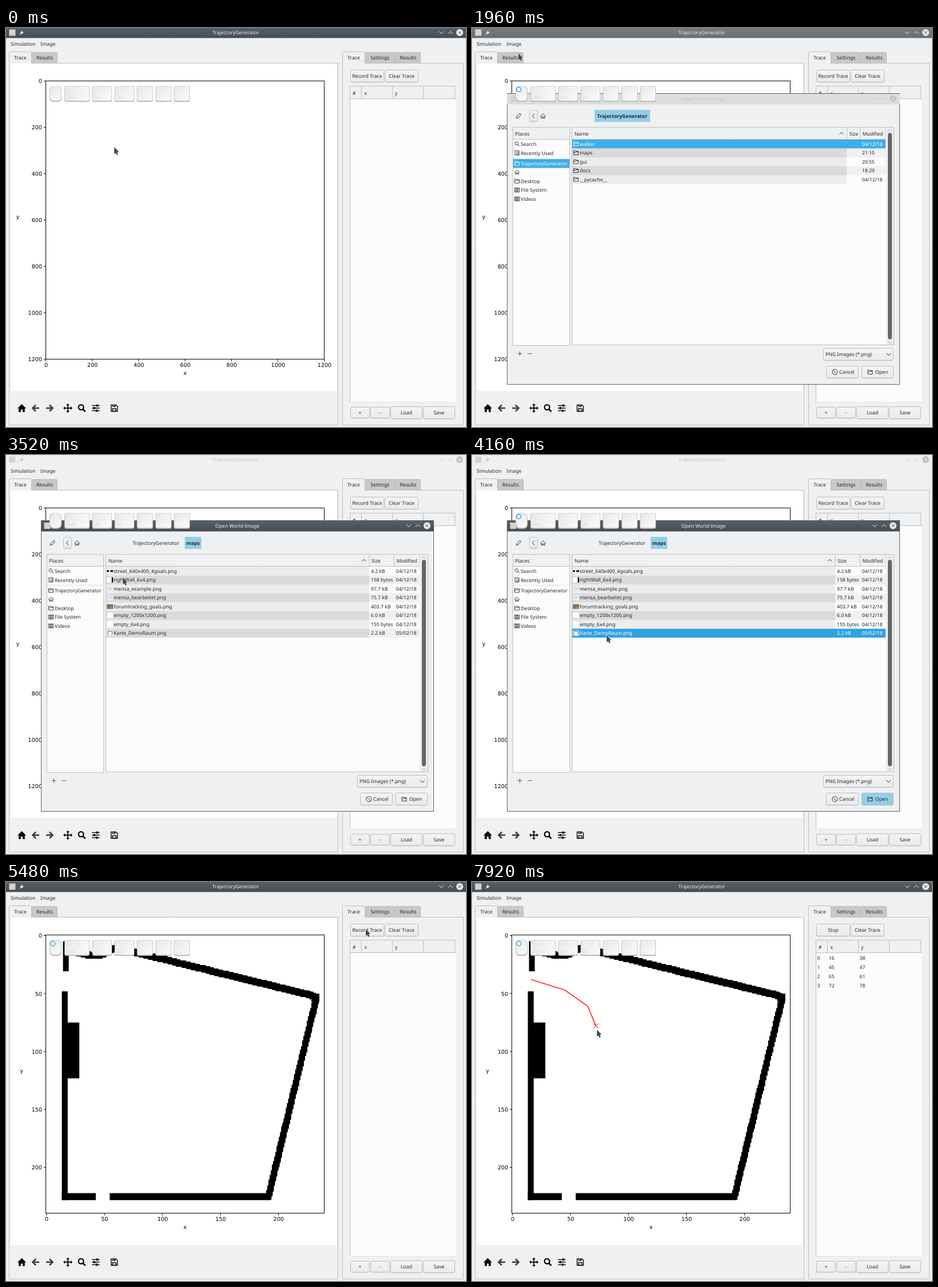
An HTML page with a canvas for the animation above (8000 ms loop, 803 px wide and 697 px high).

```html
<!DOCTYPE html>
<html lang="en">
<head>
<meta charset="utf-8">
<title>TrajectoryGenerator</title>
<style>
html, body { margin: 0; width: 100%; height: 100%; overflow: hidden; background: #eff0f1; }
canvas { display: block; }
</style>
</head>
<body>
<canvas id="stage" width="803" height="697"></canvas>
<script>
const c = document.getElementById('stage').getContext('2d');
const LOOP = 8000;
const INK = '#232629', PANEL = '#eff0f1', VIEW = '#fcfcfc', EDGE = '#bcbec0', BLUE = '#3daee9', PALE_BLUE = '#93cee9';
const UI = '8.65px "Noto Sans", sans-serif';
const BOLD = 'bold 8.65px "Noto Sans", sans-serif';
const PLOT = '9.6px "DejaVu Sans", sans-serif';

// ---- drawing helpers ----
function text(s, x, y, color = INK, align = 'left', font = UI) {
  c.font = font; c.fillStyle = color; c.textAlign = align;
  c.fillText(s, x, y);
}
function fill(x, y, w, h, color) { c.fillStyle = color; c.fillRect(x, y, w, h); }
function frame(x, y, w, h, bg, edge = EDGE, r = 0) {
  c.beginPath(); c.roundRect(x + .5, y + .5, w - 1, h - 1, r);
  if (bg) { c.fillStyle = bg; c.fill(); }
  c.strokeStyle = edge; c.lineWidth = 1; c.stroke();
}
function line(color, width, ...p) {
  c.beginPath();
  for (let i = 0; i < p.length; i += 2) c.lineTo(p[i], p[i + 1]);
  c.strokeStyle = color; c.lineWidth = width; c.stroke();
}
function shape(color, ...p) {
  c.beginPath();
  for (let i = 0; i < p.length; i += 2) c.lineTo(p[i], p[i + 1]);
  c.fillStyle = color; c.fill();
}
function ring(x, y, r, color, width) {
  c.beginPath(); c.arc(x, y, r, 0, 7); c.strokeStyle = color; c.lineWidth = width; c.stroke();
}
function chevron(x, y, dir, color = INK, s = 3.5) { line(color, 1, x - s, y - dir * s / 2, x, y + dir * s / 2, x + s, y - dir * s / 2); }
function vgrad(y, h, top, bottom) {
  const g = c.createLinearGradient(0, y, 0, y + h);
  g.addColorStop(0, top); g.addColorStop(1, bottom);
  return g;
}
function button(x, y, w, h, label, bg) {
  frame(x, y, w, h, bg || vgrad(y, h, '#f3f4f4', '#e9eaeb'), '#b9bcbe', 2);
  line('#a9adb0', .6, x + 2, y + h - .3, x + w - 2, y + h - .3);
  if (label) text(label, x + w / 2, y + h / 2 + 3.2, INK, 'center');
}
const mix = (a, b, k) => `rgb(${a.map((v, i) => Math.round(v + (b[i] - v) * k))})`;

// ---- timeline ----
// [time, x, y]: the pointer holds each position until the next
const pointer = [
  [1000, 78, 26], [1600, 80, 36], [1720, 81, 44], [2280, 130, 120], [2400, 190, 195], [2480, 212, 220], [2760, 204, 214],
  [3560, 209, 232], [3680, 220, 268], [3800, 230, 300], [3920, 235, 315],
  [4320, 243, 306], [4680, 260, 290], [5200, 420, 190], [5320, 600, 96], [5440, 628, 82],
  [5720, 450, 112], [5880, 230, 150], [6000, 130, 165], [6120, 109, 167], [6280, 107, 168], [6440, 106, 170],
  [6960, 130, 180], [7120, 165, 188], [7520, 190, 208], [7640, 205, 220], [7800, 218, 258]
];
const presses = [[1480, 1600], [1840, 2480], [2760, 3200], [3320, 3440], [4040, 4320], [5440, 5600], [6840, 6960], [7240, 7520], [7640, 7800], [7920, 8000]];
const trace = [[6840, 16, 38], [7240, 45, 47], [7640, 65, 61], [7920, 72, 78]];

function pointerAt(t) {
  if (t < 320) return [189, 208];
  if (t < 1000) {
    const u = (t - 320) / 680, k = u * u * (3 - 2 * u);
    return [189 - 111 * k, 208 - 182 * k];
  }
  return pointer.filter(p => p[0] <= t).pop().slice(1);
}
const within = (t, a, b) => t >= a && t < b;

// ---- window decoration ----
function titleBar(x, y, w, h, label, active, pinned) {
  const pale = [239, 240, 241];
  fill(x, y, w, h, vgrad(y, h, mix(pale, [86, 96, 104], active), mix(pale, [69, 77, 84], active)));
  const fg = mix([190, 194, 197], [239, 240, 241], active);
  const mid = y + (pinned ? 8 : 9), right = x + w;
  text(label, x + w / 2 - (pinned ? .5 : 0), mid + 3.2, fg, 'center');
  fill(x + 5.5, mid - 5.5, 11, 11, '#d6d3cf');
  if (pinned) {
    shape(fg, 27, 4.5, 31, 8.5, 29, 9, 27, 11, 24.5, 8.5, 26.5, 7);
    line(fg, 1, 26, 9.5, 23.5, 12);
  }
  chevron(right - (pinned ? 43 : 44), mid, 1, fg, 4);
  chevron(right - (pinned ? 27 : 28), mid, -1, fg, 4);
  const cx = right - (pinned ? 11 : 12);
  c.beginPath(); c.arc(cx, mid, 6, 0, 7); c.fillStyle = fg; c.fill();
  const cross = mix([239, 240, 241], [71, 80, 87], active);
  line(cross, 1, cx - 2.7, mid - 2.7, cx + 2.7, mid + 2.7);
  line(cross, 1, cx + 2.7, mid - 2.7, cx - 2.7, mid + 2.7);
}
function tabs(x, ...items) {
  items.forEach(([label, w], i) => {
    if (i) frame(x, 42, w, 20, '#c6c8c9', '#bcbec0', 2);
    else {
      frame(x, 41, w + 1, 22, PANEL, EDGE, 2);
      fill(x + 1, 61, w - 1, 3, PANEL);
    }
    text(label, x + w / 2 + .5, 55, INK, 'center');
    x += w;
  });
}

// ---- icons ----
function house(x, y, s, color, solid) {
  const p = [x - s, y, x, y - s, x + s, y, x + s * .7, y, x + s * .7, y + s * .85, x + s * .22, y + s * .85,
    x + s * .22, y + s * .25, x - s * .22, y + s * .25, x - s * .22, y + s * .85, x - s * .7, y + s * .85, x - s * .7, y, x - s, y];
  if (solid) shape(color, ...p); else line(color, .9, ...p);
}
function folder(x, y, color = INK) {
  line(color, .9, x, y - 3.5, x + 3, y - 3.5, x + 4, y - 2.5, x + 8, y - 2.5, x + 8, y + 3.5, x, y + 3.5, x, y - 3.5);
  line(color, .9, x, y - .5, x + 3, y - .5, x + 4, y - 1.5, x + 8, y - 1.5);
}
function arrow(x, dir) {
  line('#3a3c3e', 2.6, x - dir * 6, 664, x + dir * 5, 664);
  line('#3a3c3e', 2.6, x, 658.5, x + dir * 5.5, 664, x, 669.5);
}
function toolbar() {
  house(27.5, 664.5, 7.5, '#000', true);
  arrow(52, -1); arrow(76, 1);
  line('#000', 1.8, 102, 664, 114, 664); line('#000', 1.8, 108, 658, 108, 670);
  for (const [dx, dy] of [[1, 0], [-1, 0], [0, 1], [0, -1]]) {
    const x = 108 + dx * 5, y = 664 + dy * 5;
    shape('#000', x + dx * 3, y + dy * 3, x + dy * 3, y + dx * 3, x - dy * 3, y - dx * 3);
  }
  ring(131, 662.5, 4.4, '#000', 2.2); line('#000', 2.6, 134.3, 666, 138.5, 670.2);
  [[659.5, 159], [664, 154], [668.5, 158]].forEach(([y, x]) => {
    line('#000', 1.4, 150, y, 163.5, y);
    fill(x - 1.2, y - 2, 2.8, 4, '#000');
  });
  line('#000', 1.4, 183.5, 658.5, 192, 658.5, 194.5, 661, 194.5, 669.5, 183.5, 669.5, 183.5, 657.8);
  fill(186, 658.5, 5, 3.5, '#000'); fill(187.5, 659, 1.6, 2, '#fff');
  c.strokeRect(186, 665, 6, 4.5);
}

// ---- plot ----
const CELL = 2.025;
const px = v => 70.5 + CELL * v, py = v => 93.5 + CELL * v;
const snap = (v, origin) => origin + Math.round((v - origin) / CELL) * CELL;
function wall(x0, y0, x1, y1, w, h) {
  const n = Math.ceil(Math.hypot(x1 - x0, y1 - y0) / CELL);
  for (let i = 0; i <= n; i++)
    fill(snap(x0 + (x1 - x0) * i / n - w / 2, 69.5), snap(y0 + (y1 - y0) * i / n - h / 2, 92.5), w, h, '#000');
}
function room() {
  fill(99.5, 103.5, 10, 52.5, '#000');
  fill(97.5, 191, 10.2, 364.7, '#000');
  fill(107, 245.5, 21, 97.5, '#000');
  fill(97.5, 543.5, 59.3, 12.2, '#000');
  fill(181, 543.5, 281, 12.2, '#000');
  wall(112, 120, 150, 129, 10, 11);
  wall(150, 129, 162, 129, 10, 11);
  wall(162, 129, 188, 115.5, 10, 11);
  wall(188, 115.5, 222, 122, 10, 11);
  wall(222, 122, 537, 199, 10, 11);
  fill(533, 195, 14, 14, '#000');
  wall(541, 206, 458.5, 548, 9, 13);
}
function plot(t, loaded) {
  fill(8, 62, 570, 572, '#fff');
  const label = (s, x, y, align) => text(s, x, y, '#000', align, PLOT);
  if (loaded) room();
  c.lineWidth = 1; c.strokeStyle = '#000';
  c.strokeRect(69.5, 92.5, 486, 486);
  const step = loaded ? 50 : 200, last = loaded ? 200 : 1200;
  for (let v = 0; v <= last; v += step) {
    const d = loaded ? v * CELL + 1 : v * 486 / 1200;
    line('#000', 1, 69.5 + d, 579, 69.5 + d, 582.5);
    line('#000', 1, 66, 92.5 + d, 69.5, 92.5 + d);
    label(v, 70 + d, 592, 'center');
    label(v, 63, 96.3 + d, 'right');
  }
  label('x', 312.5, 605.5, 'center');
  label('y', loaded ? 27 : 20.5, 333, 'center');
  const points = trace.filter(p => t >= p[0]).map(p => [px(p[1]), py(p[2])]);
  if (points.length) {
    line('#f00', 1.4, ...points.flat());
    const [x, y] = points.at(-1);
    line('#f00', 1, x - 4.5, y - 4.5, x + 4.5, y + 4.5);
    line('#f00', 1, x + 4.5, y - 4.5, x - 4.5, y + 4.5);
  }
}

// ---- main window ----
function mainWindow(t) {
  fill(0, 0, 803, 697, PANEL);
  const active = within(t, 1960, 2120) ? .8 : within(t, 2120, 4320) ? 0 : within(t, 4320, 4520) ? .6 : 1;
  titleBar(0, 0, 803, 17.5, 'TrajectoryGenerator', active, true);
  text('Simulation', 8, 31); text('Image', 60.3, 31);
  frame(5, 61, 575, 633, PANEL); tabs(5, ['Trace', 39], ['Results', 46]);
  frame(587, 61, 212, 633, PANEL); tabs(587, ['Trace', 39], ['Settings', 53], ['Results', 45]);
  plot(t, t >= 4520);
  toolbar();
  button(601, 73, 59, 22, t >= 5520 ? 'Stop' : 'Record Trace');
  button(661, 73, 59, 22, 'Clear Trace');
  fill(601, 102, 184, 552, VIEW);
  fill(601, 102, 184, 22, PANEL);
  line(EDGE, 1, 600.5, 654, 600.5, 101.5, 784.5, 101.5);
  line(EDGE, 1, 601, 123.5, 785, 123.5);
  for (const x of [620.5, 674.5, 728.5, 783.5]) line(EDGE, 1, x, 102, x, 124);
  line('#e3e4e5', 1, 601, 653.5, 785, 653.5);
  text('#', 605, 117); text('x', 625.5, 117); text('y', 679, 117);
  trace.forEach(([at, x, y], i) => {
    if (t < at) return;
    const base = 135.5 + i * 16.2;
    text(i, 602.5, base); text(x, 622.7, base); text(y, 676.5, base);
  });
  button(601, 662, 34, 20, '+'); button(636, 662, 34, 20, '-');
  button(671, 661, 56, 22, 'Load'); button(728, 661, 56, 22, 'Save');
}

// ---- file dialog ----
const folders = [['walker', '04/12/18'], ['maps', '21:10'], ['gui', '20:55'], ['docs', '18:29'], ['__pycache__', '04/12/18']]
  .map(([name, date]) => ({ name, date, size: '' }));
const images = [['street_640x400_4goals.png', '4.2 kB'], ['rightWall_6x4.png', '158 bytes'], ['mensa_example.png', '97.7 kB'],
  ['mensa_bearbeitet.png', '75.7 kB'], ['forumtracking_goals.png', '403.7 kB'], ['empty_1200x1200.png', '6.0 kB'],
  ['empty_6x4.png', '155 bytes'], ['Karte_DemoRaum.png', '2.2 kB']]
  .map(([name, size], i) => ({ name, size, date: i == 7 ? '05/02/18' : '04/12/18' }));

function thumbnail(i, y) {
  if (i == 0) { fill(176, y - 2, 11, 4, '#fff'); fill(176, y - 1.5, 4, 3, '#111'); fill(182, y - 1.5, 5, 3, '#111'); return; }
  if (i == 4) { fill(176, y - 4, 11, 8, '#8a6a55'); fill(177, y - 3, 4, 3, '#587a9a'); fill(182, y, 4, 3, '#b98a3e'); return; }
  fill(176, y - 4.5, 11, 9, i == 2 || i == 3 ? '#e9e9e9' : '#fff');
  if (i == 1) fill(184.5, y - 4.5, 2.5, 9, '#111');
  if (i == 2 || i == 3) line('#b5b5b5', .8, 177, y - 2, 181, y, 186, y - 1);
  if (i == 7) line('#333', .8, 178, y + 4, 178, y - 3.5, 186, y - 2.5, 184.5, y + 4);
}
function places(selected) {
  frame(71, 173, 100, 382, VIEW);
  fill(72, 174, 98, 20.5, PANEL); line(EDGE, 1, 72, 194.5, 170, 194.5);
  text('Places', 75, 188);
  line('#dcdddd', 1, 73, 227.5, 169, 227.5);
  if (selected) fill(72, 229, 98, 15.5, BLUE);
  ring(77.8, 201.5, 2.8, INK, .9); line(INK, .9, 80, 203.7, 83, 206.5);
  c.strokeRect(75, 214.5, 7, 7.5); ring(79.5, 219, 2, INK, .9);
  folder(74.5, 236.5, selected ? '#fff' : INK);
  house(78.5, 252, 4, INK);
  folder(74.5, 267.5);
  for (const y of [283, 298.5]) {
    c.strokeStyle = INK; c.lineWidth = .9; c.strokeRect(74.5, y - 3.5, 8, 7);
    c.strokeRect(76.5, y - 2, 4, 2.5); line(INK, .9, 76, y + 2, 81, y + 2);
  }
  [['Search', 206], ['Recently Used', 221.5], ['TrajectoryGenerator', 240], ['Desktop', 270.7], ['File System', 286.2], ['Videos', 301.7]]
    .forEach(([s, y], i) => text(s, 85, y, i == 2 && selected ? '#fff' : INK));
}
function fileList(rows, selected, hover, split) {
  frame(174, 173, 563, 381, VIEW);
  fill(175, 174, 547, 20.5, PANEL); line(EDGE, 1, 175, 194.5, 722, 194.5);
  for (const x of [split, 677.5, 722]) line(EDGE, 1, x, 174, x, 194);
  text('Name', 179, 188); text('Size', split + 4, 188); text('Modified', 681.7, 188);
  chevron(split - 9.5, 184, -1);
  rows.forEach((row, i) => {
    const top = 195 + i * 15.5, mid = top + 7.75, on = i == selected, odd = i % 2;
    if (on) fill(175, top, 547, 15.5, hover ? '#30a2e2' : BLUE);
    else {
      fill(175, top, split - 175, 15.5, odd ? '#dadada' : '#ececec');
      if (odd) fill(split, top, 722 - split, 15.5, '#f0f0f0');
    }
    const ink = on ? '#fff' : INK;
    if (rows == images) thumbnail(i, mid); else folder(177.5, mid - .3, ink);
    text(row.name, 188, mid + 3.2, ink);
    text(row.size, split + 3, mid + 3.2, ink);
    text(row.date, 680.7, mid + 3.2, ink);
  });
  fill(722, 174, 14, 379, PANEL);
  chevron(729, 179, -1, '#999c9e'); chevron(729, 549, 1, '#999c9e');
  frame(726, 183, 7, 361, '#65686b', '#5c5f62', 3);
}
function dialog(t) {
  const inMaps = t >= 3440, chosen = t >= 4040;
  frame(61, 115, 686, 508, PANEL, '#5b6268');
  titleBar(61, 114.5, 686, 19, 'Open World-Image', t < 2120 ? .12 : 1, false);
  line('#5b6268', 1, 61, 114.5, 747, 114.5);
  line(INK, 1, 77.5, 157.5, 78, 154.5, 83.5, 149, 85.8, 151.3, 80.3, 157, 77.5, 157.5);
  button(100, 143.5, 15, 20); line(INK, 1, 109.3, 149.5, 105.3, 153.5, 109.3, 157.5);
  house(124, 154, 4.3, INK);
  if (inMaps) {
    text('TrajectoryGenerator', 221, 157);
    fill(312, 143, 29, 21, PALE_BLUE); text('maps', 326.5, 157, INK, 'center', BOLD);
  } else {
    fill(214, 143, 97, 21, PALE_BLUE); text('TrajectoryGenerator', 262.3, 157, INK, 'center', BOLD);
  }
  places(!inMaps);
  if (inMaps) fileList(images, chosen ? 7 : -1, true, 634);
  else fileList(folders, t < 2760 ? 0 : 1, t >= 2760, 654.5);
  line('#55595c', 1, 79.5, 568.8, 87.5, 568.8); line('#55595c', 1, 83.5, 564.8, 83.5, 572.8);
  line('#55595c', 1, 97, 568.8, 105, 568.8);
  button(613, 559, 123, 22); text('PNG Images (*.png)', 617, 573.2); chevron(727, 570, 1, INK, 4);
  button(618, 590, 57, 22); ring(633.5, 601, 4.6, INK, .9); line(INK, .9, 630.3, 597.8, 636.7, 604.2); text('Cancel', 641, 604.2);
  button(680, 590, 56, 22, '', chosen && PALE_BLUE); folder(691, 601); text('Open', 704, 604.2);
}

// ---- input overlay ----
function keycap(x, w, label, r = 3) {
  c.beginPath(); c.roundRect(x, 101.5, w, 27.5, r); c.fillStyle = '#b4b4b4'; c.fill();
  const g = c.createLinearGradient(x, 102, x + w, 127);
  g.addColorStop(0, '#e6e6e6'); g.addColorStop(.4, '#efefef'); g.addColorStop(1, '#fbfbfb');
  c.beginPath(); c.roundRect(x + .7, 102, w - 1.4, 25.2, r); c.fillStyle = g; c.fill();
  if (label) text(label, x + 4, 124, '#d6d6d6', 'left', '7px "Noto Sans", sans-serif');
}
function overlay(pressed) {
  keycap(76, 21, '', 7);
  [[102, 44, 'shift'], [150.5, 34.5, 'ctrl'], [189.5, 34.5, 'alt'], [228.5, 28], [261, 28], [293, 28]].forEach(k => keycap(...k));
  if (pressed) {
    c.beginPath(); c.arc(81.8, 107.5, 4.2, 0, 7); c.fillStyle = '#f6fafc'; c.fill();
    ring(81.8, 107.5, 3.9, '#35a9dc', 1.5);
  }
}
function drawPointer([x, y]) {
  c.save(); c.translate(x, y);
  const outline = [0, 0, 0, 12, 2.6, 10.2, 4.6, 14, 6.6, 13, 5.2, 9.3, 8, 8.3, 0, 0];
  line('rgba(255,255,255,.75)', 1.4, ...outline);
  shape('#48494b', ...outline);
  c.restore();
}

function render() {
  const t = performance.now() % LOOP;
  c.textRendering = 'geometricPrecision';
  mainWindow(t);
  if (within(t, 1960, 4320)) dialog(t);
  if (within(t, 4320, 4520)) fill(61, 115, 686, 508, PANEL);
  if (within(t, 4520, 4680)) fill(578, 115, 169, 508, PANEL);
  overlay(presses.some(([a, b]) => within(t, a, b)));
  drawPointer(pointerAt(t));
  requestAnimationFrame(render);
}
render();
</script>
</body>
</html>
```
